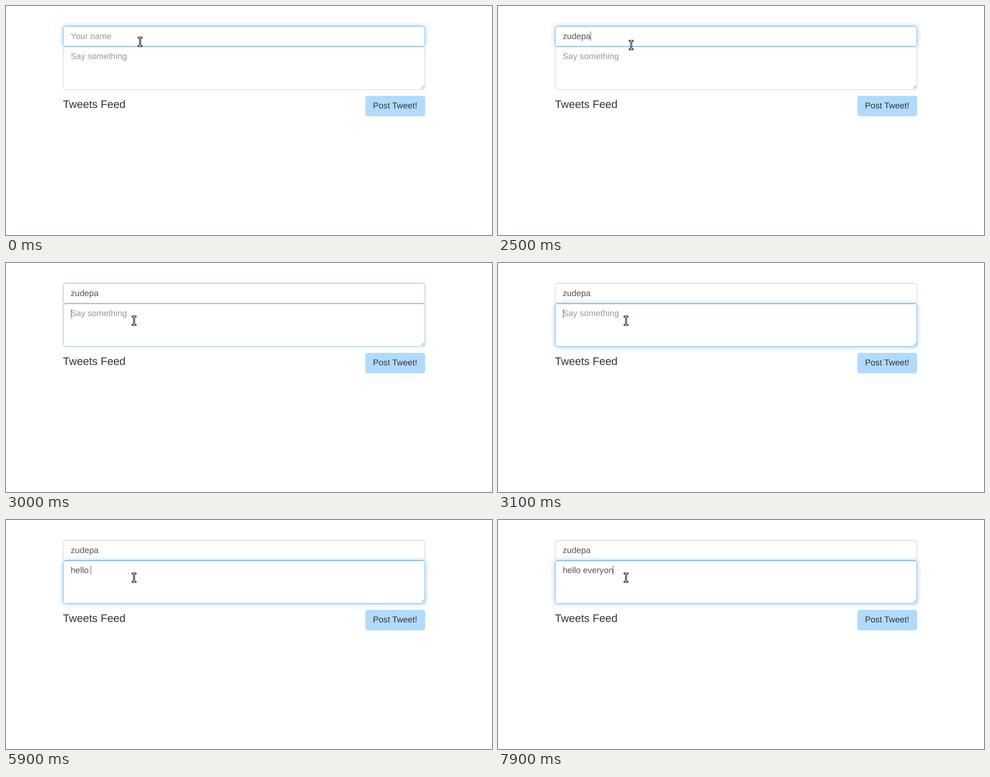
Recreate the animation shown at these times as an HTML page. Size 1040 by 492 pixels, loop 8000 ms.

```html
<!DOCTYPE html>
<html lang="en">
<head>
<meta charset="utf-8">
<title>Feed form</title>
<style>
  html, body { margin: 0; width: 100%; height: 100%; overflow: hidden; background: #fff; }
  #stage { position: relative; width: 1040px; height: 492px; overflow: hidden; }
  #stage > * { position: absolute; }
  .field { left: 122px; width: 775px; box-sizing: border-box; border: 1px solid #ccc; border-radius: 5.2px; background: #fff; }
  #nameBox { top: 43px; height: 44px; }
  #messageBox { top: 87px; height: 93px; }
  #button { left: 769px; top: 193px; width: 128px; height: 44px; border-radius: 5.2px; background: #b0dbff; }
  svg { left: 0; top: 0; }
  text { font: 18.2px "Liberation Sans", Arial, sans-serif; fill: #333; white-space: pre; text-rendering: geometricPrecision; }
  #heading { font-size: 23.4px; }
  #caret { fill: #555; }
  #pointer { fill: none; stroke-linecap: square; }
</style>
</head>
<body>
<div id="stage">
  <div id="nameBox" class="field"></div>
  <div id="messageBox" class="field"></div>
  <div id="button"></div>
  <svg width="1040" height="492" viewBox="0 0 1040 492">
    <path d="M888.5 177.5L895 171M892.5 177.5L895 175" stroke="#666" fill="none"/>
    <text id="nameText" x="138.45" y="71"></text>
    <text id="messageText" x="138.45" y="114"></text>
    <text id="heading" x="121.85" y="219">Tweets Feed</text>
    <text x="785.3" y="220">Post Tweet!</text>
    <rect id="caret" width="1" height="20"/>
    <g id="pointer">
      <path id="beam" d="M-3 -9H3M0 -9V9M-3 9H3" stroke="#000" stroke-width="3.6"/>
      <use href="#beam"/>
      <path d="M-3 -9H3M0 -9V9M-3 9H3" stroke="#fff" stroke-width="1.4"/>
    </g>
  </svg>
</div>
<script>
const LOOP = 8000, STEP = 100, TEXT_LEFT = 138.45;
const FOCUS_TIME = 3000;
const el = id => document.getElementById(id);
const clamp = v => Math.max(0, Math.min(1, v));
const mix = (a, b, p) => a + (b - a) * p;
const smooth = p => p * p * (3 - 2 * p);

const nameField = {
  box: el("nameBox"), label: el("nameText"), hint: "Your name", value: "zudepa",
  keys: [1200, 1400, 1600, 1800, 1900, 2100]
};
const messageField = {
  box: el("messageBox"), label: el("messageText"), hint: "Say something", value: "hello everyon",
  keys: [4700, 4900, 5100, 5300, 5500, 5900, 6300, 6500, 6700, 7000, 7300, 7600, 7900]
};

// Times at which the caret is shown: [from, to)
const caretSpans = [[300, 900], [1200, 2600], [3000, 3500], [4100, LOOP]];

function typedCount(field, t) {
  return field.keys.filter(k => k <= t).length;
}

function drawField(field, t, focus) {
  const count = typedCount(field, t);
  field.label.textContent = count ? field.value.slice(0, count) : field.hint;
  field.label.style.fill = count ? "#555" : "#999";
  const border = [[204, 102], [204, 175], [204, 233]].map(([a, b]) => Math.round(mix(a, b, focus)));
  field.box.style.borderColor = `rgb(${border})`;
  field.box.style.boxShadow = "inset 0 1.3px 1.3px rgba(0,0,0,.075)" +
    `, 0 0 ${10.4 * focus}px rgba(102,175,233,${0.6 * focus})`;
}

function drawCaret(t) {
  const inMessage = t >= FOCUS_TIME;
  const field = inMessage ? messageField : nameField;
  const typed = typedCount(field, t) > 0;
  const x = typed ? Math.floor(TEXT_LEFT + field.label.getComputedTextLength()) : 139;
  const y = !inMessage ? 55 : typed ? 98 : 99;
  const caret = el("caret");
  caret.setAttribute("x", x);
  caret.setAttribute("y", y);
  caret.style.display = caretSpans.some(([a, b]) => t >= a && t < b) ? "" : "none";
}

function draw(time) {
  const t = Math.floor((time % LOOP) / STEP) * STEP;
  const focus = clamp((t - FOCUS_TIME + 50) / 100);
  drawField(nameField, t, 1 - focus);
  drawField(messageField, t, focus);
  drawCaret(t);
  const move = smooth(clamp((t - 2400) / 400));
  el("pointer").setAttribute("transform",
    `translate(${Math.round(mix(287, 274, move))} ${Math.round(mix(77, 124, move))})`);
}

const start = performance.now();
function tick() {
  draw(performance.now() - start);
  requestAnimationFrame(tick);
}
tick();
</script>
</body>
</html>
```
